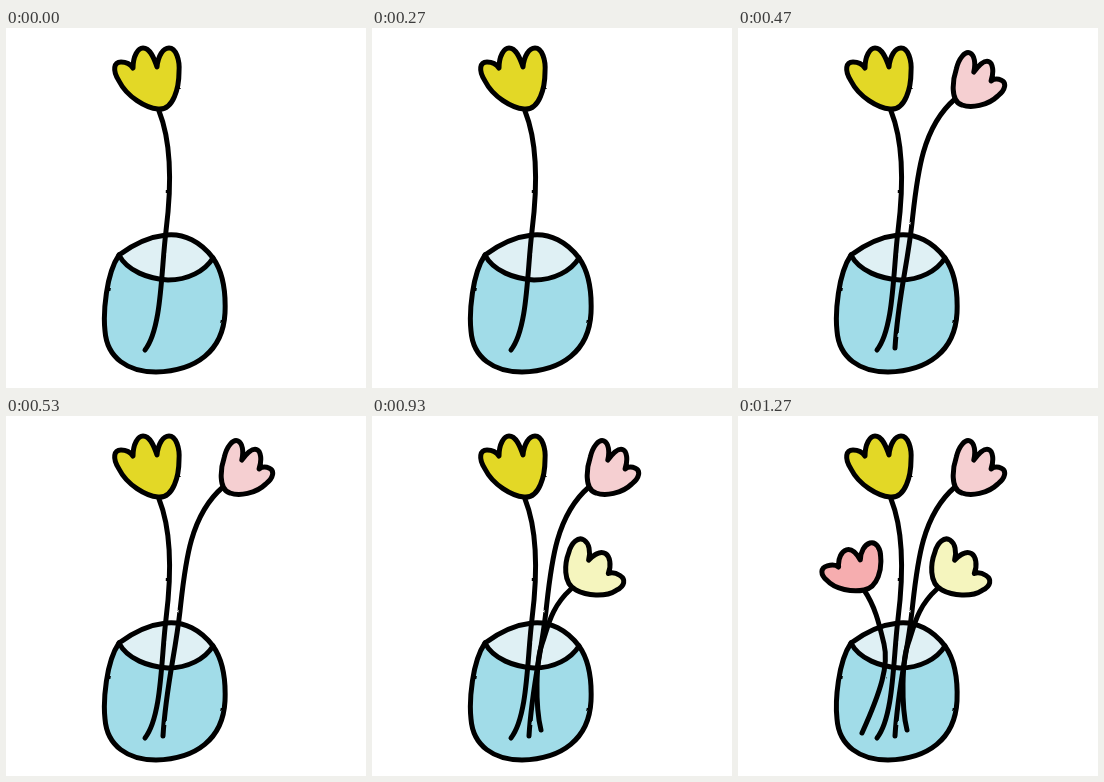
An HTML page for the animation above (1.59 s loop, 360x360 px).

```html
<!DOCTYPE html>
<html lang="en">
<head>
<meta charset="utf-8">
<title>Flowers in a vase</title>
<style>
  html, body { margin: 0; width: 100%; height: 100%; overflow: hidden; background: #fff; }
  svg { display: block; width: 100%; height: 100%; }
</style>
</head>
<body>
<svg viewBox="0 0 360 360">
  <defs>
    <filter id="ink" filterUnits="userSpaceOnUse" x="0" y="0" width="360" height="360" color-interpolation-filters="sRGB">
      <feTurbulence type="fractalNoise" baseFrequency="0.09" numOctaves="1" seed="4"/>
      <feDisplacementMap in="SourceGraphic" scale="2" xChannelSelector="R" yChannelSelector="G"/>
    </filter>
  </defs>
  <g id="art" filter="url(#ink)" fill="none" stroke="#000" stroke-width="5" stroke-linecap="round" stroke-linejoin="round">
    <path fill="#a1dce8" d="M113,227 C100,246 97,285 99,303 C101,330 122,344 150,344 C190,343 217,323 219,285 C220,262 217,244 207,230"/>
    <path fill="#dff0f4" d="M113,227 C121,243 143,251 162,252 C182,252 199,243 207,230 C195,214 178,205 160,207 C142,209 125,218 113,227Z"/>
  </g>
</svg>
<script>
const LOOP = 1590;
const art = document.getElementById('art');

// One tulip outline; every bloom is this shape moved onto its own three anchors.
const tulip = {
  anchors: [[152, 81], [163, 20], [110, 38]], // base, tall petal, outer petal
  path: 'M152,81 C140,80 121,69 113,53 C106,42 108,34 115,34 C121,34 125,37 127,40 ' +
        'C127,28 132,20 137,20 C144,20 148,30 151,39 C152,28 157,20 163,20 ' +
        'C170,20 174,32 173,44 C173,58 168,83 152,81Z'
};

const flowers = [
  { at: 0, fill: '#e3d826', anchors: tulip.anchors,
    stem: 'M153,83 C167,118 165,163 160,203 S156,300 139,322' },
  { at: 400, fill: '#f5cfd1', anchors: [[224, 77], [232, 25], [266, 57]],
    stem: 'M217,71 C183,100 179,150 174,195 S160,270 157,320' },
  { at: 800, fill: '#f5f5be', anchors: [[204, 174], [212, 124], [251, 165]],
    stem: 'M199,173 C178,192 176,212 170,228 S163,290 169,314' },
  { at: 1200, fill: '#f6adaf', anchors: [[126, 174], [132, 127], [85, 154]],
    stem: 'M126,174 C137,190 141,207 146,228 S143,275 124,317' }
];

const sub = (a, b) => [a[0] - b[0], a[1] - b[1]];
const cross = (a, b) => a[0] * b[1] - a[1] * b[0];

function bloom([base, tall, outer]) {
  const origin = tulip.anchors[0];
  const [a, b] = tulip.anchors.slice(1).map(p => sub(p, origin));
  const [c, d] = [sub(tall, base), sub(outer, base)];
  return tulip.path.replace(/(\d+),(\d+)/g, (_, x, y) => {
    const p = sub([x, y], origin);
    const u = cross(p, b) / cross(a, b), v = cross(a, p) / cross(a, b);
    return base.map((n, i) => (n + u * c[i] + v * d[i]).toFixed(1)).join();
  });
}

function add(parent, tag, attrs) {
  const node = document.createElementNS(art.namespaceURI, tag);
  for (const key in attrs) node.setAttribute(key, attrs[key]);
  return parent.appendChild(node);
}

for (const f of flowers) {
  f.node = add(art, 'g');
  add(f.node, 'path', { d: f.stem });
  add(f.node, 'path', { d: bloom(f.anchors), fill: f.fill });
}

function render(t) {
  for (const f of flowers) f.node.style.display = t >= f.at ? '' : 'none';
}

const start = performance.now();
function tick() {
  render((performance.now() - start) % LOOP);
  requestAnimationFrame(tick);
}
tick();
</script>
</body>
</html>
```
